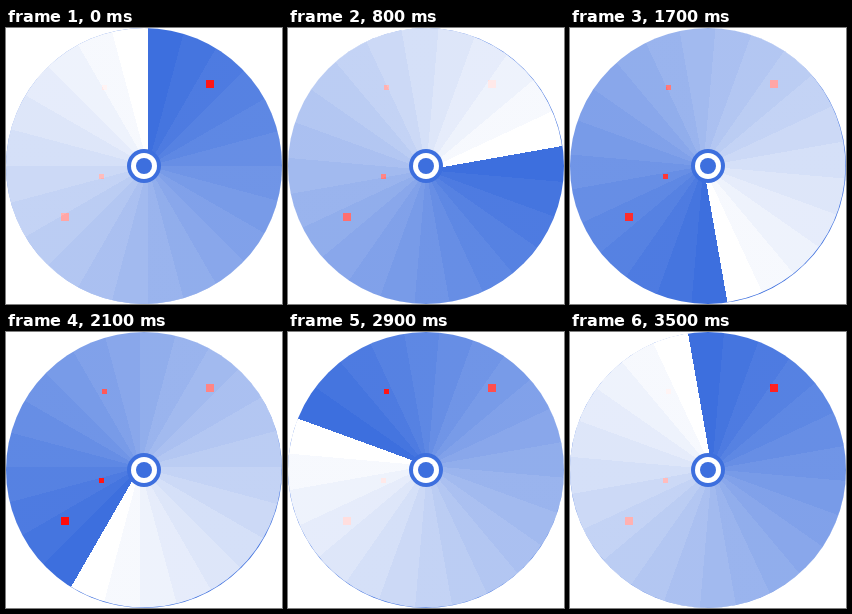
Animation, 276 px wide and 276 px high, one loop 3.6 s. Source, as an HTML page:

```html
<!DOCTYPE html>
<html lang="en">
<head>
<meta charset="utf-8">
<title>Radar sweep</title>
<style>
  html, body { margin: 0; width: 100%; height: 100%; overflow: hidden; background: #fff; }
  #radar { position: relative; width: 276px; height: 276px; --blue: #3d6fde; }
  #radar * { position: absolute; }
  .disc { inset: 0; border-radius: 50%; background: var(--blue); }
  .blip { background: #f00; }
  #sweep { inset: .3px; border-radius: 50%; }
  .hub {
    left: 130px; top: 130px; width: 16px; height: 16px; border-radius: 50%;
    background: var(--blue);
    box-shadow: 0 0 0 5px #fff, 0 0 0 9px var(--blue);
  }
</style>
</head>
<body>
<div id="radar">
  <div class="disc"></div>
  <div id="sweep"></div>
  <div class="hub"></div>
</div>
<script>
  const LOOP = 3600, STEP = 100, BANDS = 24;
  const sweep = document.getElementById('sweep');

  // Blips lie under the white veil, so the sweep reveals and fades them.
  for (const [x, y, size] of [[200, 52, 7.5], [96, 57, 5], [55, 185, 8], [93, 146, 5]]) {
    const blip = document.createElement('div');
    blip.className = 'blip';
    blip.style.cssText = `left:${x}px;top:${y}px;width:${size}px;height:${size}px`;
    sweep.before(blip);
  }

  // Veil in flat sectors, clear to white; its apex sits 4px off the hub.
  const turn = 360 / BANDS;
  const stops = Array.from({ length: BANDS }, (_, i) =>
    `rgba(255,255,255,${i / (BANDS - 1)}) ${i * turn}deg ${(i + 1) * turn}deg`);
  sweep.style.background = `conic-gradient(at calc(50% + 4px) 50%, ${stops})`;

  function draw() {
    const step = Math.floor(performance.now() % LOOP / STEP);
    sweep.style.transform = `rotate(${step * STEP / LOOP * 360}deg)`;
    requestAnimationFrame(draw);
  }
  draw();
</script>
</body>
</html>
```
